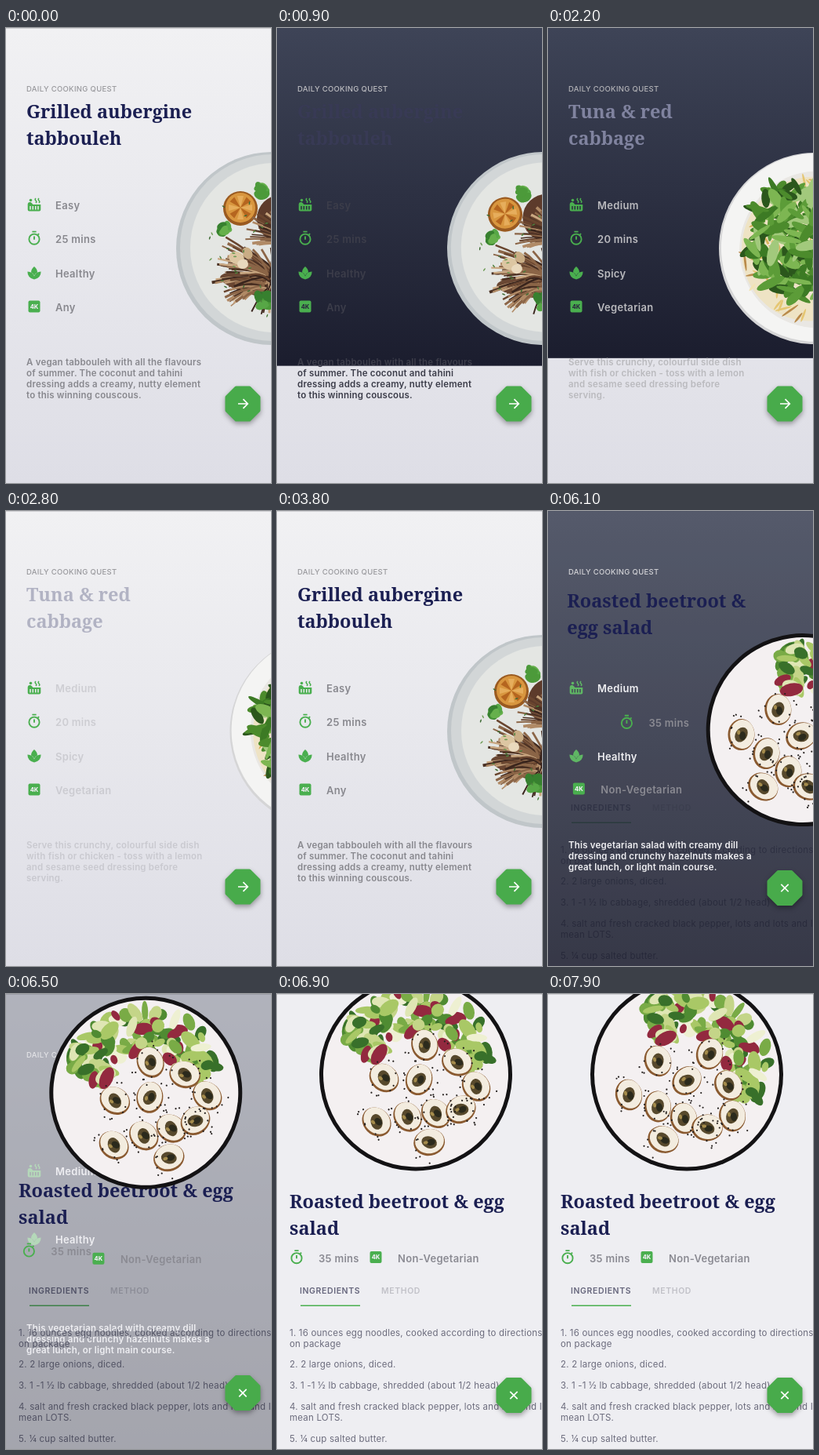
These frames come from a looping animation (338 px wide and 580 px high, 8000 ms). An HTML page:

```html
<!DOCTYPE html>
<html lang="en">
<head>
<meta charset="utf-8">
<title>Daily cooking quest</title>
<style>
html, body { margin: 0; width: 100%; height: 100%; overflow: hidden; background: #ececf0; }
svg { display: block; width: 100%; height: 100%; }
text { font-family: Inter, Roboto, sans-serif; white-space: pre; }
.title { font: 700 23.5px "Noto Serif", serif; }
.label { font-size: 9.5px; font-weight: 500; letter-spacing: .3px; }
.item { font-size: 13px; font-weight: 600; letter-spacing: .3px; }
.desc { font-size: 11.5px; font-weight: 600; letter-spacing: .2px; }
.step { font-size: 11.5px; letter-spacing: .2px; fill: #6c6c7d; }
.tab { font-size: 10.5px; font-weight: 600; letter-spacing: .6px; }
.k { font-size: 7.5px; font-weight: 800; }
#fab { filter: drop-shadow(0 3px 3px rgba(0, 0, 0, .35)); }
</style>
</head>
<body>
<svg id="stage" viewBox="0 0 338 580" preserveAspectRatio="none"></svg>
<script>
const LOOP = 8000, GREEN = '#4aaf4f';
const NAVY = [27, 31, 82], GREY = [136, 136, 142], WHITE = [240, 240, 243];
const DIM_TITLE = [70, 72, 86], DIM_TEXT = [22, 24, 40];
const LABEL_LIGHT = [152, 152, 156], LABEL_DARK = [208, 208, 212];
const BG_LIGHT = [236, 236, 240], BG_DARK = [42, 46, 62];

const recipes = [
  { title: ['Grilled aubergine', 'tabbouleh'], items: ['Easy', '25 mins', 'Healthy', 'Any'],
    desc: ['A vegan tabbouleh with all the flavours', 'of summer. The coconut and tahini',
      'dressing adds a creamy, nutty element', 'to this winning couscous.'] },
  { title: ['Tuna & red', 'cabbage'], items: ['Medium', '20 mins', 'Spicy', 'Vegetarian'],
    desc: ['Serve this crunchy, colourful side dish', 'with fish or chicken - toss with a lemon',
      'and sesame seed dressing before', 'serving.'] },
  { title: ['Roasted beetroot &', 'egg salad'], items: ['Medium', '35 mins', 'Healthy', 'Non-Vegetarian'],
    desc: ['This vegetarian salad with creamy dill', 'dressing and crunchy hazelnuts makes a',
      'great lunch, or light main course.'] }
];
const restAngle = [0, 0, 18];
// Page changes: sheet start, sheet end, plate swap end
const moves = [
  { from: 0, to: 1, dark: true, s: 400, e: 1150, end: 1500 },
  { from: 1, to: 0, dark: false, s: 1850, e: 2520, end: 3300 },
  { from: 0, to: 2, dark: true, s: 4000, e: 4850, end: 5500 }
];
const OPEN = 6000, OPEN_MS = 770;

const clamp = v => Math.max(0, Math.min(1, v));
const span = (t, a, b) => clamp((t - a) / (b - a));
const lerp = (a, b, k) => a + (b - a) * k;
const mix = (a, b, k) => `rgb(${a.map((v, i) => Math.round(lerp(v, b[i], k)))})`;
const smooth = u => u * u * (3 - 2 * u);
const easeOut = u => 1 - (1 - u) ** 3;

// cubic-bezier(.4, 0, .2, 1)
function fastSlow(x) {
  let lo = 0, hi = 1, s = .5;
  for (let i = 0; i < 20; i++) {
    s = (lo + hi) / 2;
    const r = 1 - s;
    if (1.2 * r * r * s + .6 * r * s * s + s ** 3 < x) lo = s; else hi = s;
  }
  return 3 * (1 - s) * s * s + s ** 3;
}

function random(seed) {
  return () => {
    seed = (seed + 0x6D2B79F5) | 0;
    let x = Math.imul(seed ^ (seed >>> 15), 1 | seed);
    x = (x + Math.imul(x ^ (x >>> 7), 61 | x)) ^ x;
    return ((x ^ (x >>> 14)) >>> 0) / 4294967296;
  };
}

const repeat = (n, f) => Array.from({ length: n }, (_, i) => f(i)).join('');
const esc = s => s.replace(/&/g, '&amp;');
const text = (x, y, cls, s, extra = '') => `<text x="${x}" y="${y}" class="${cls}" ${extra}>${esc(s)}</text>`;
const circle = (x, y, r, fill, extra = '') => `<circle cx="${x}" cy="${y}" r="${r}" fill="${fill}" ${extra}/>`;
const oval = (x, y, rx, ry, a, fill, extra = '') =>
  `<ellipse rx="${rx}" ry="${ry}" fill="${fill}" transform="translate(${x} ${y}) rotate(${a})" ${extra}/>`;

// Icons are drawn around their centre
const icons = {
  tub: `<g fill="${GREEN}">${circle(-4.5, -5.5, 1.8, GREEN)}
    <path d="M-8.3 0v-.5q0-2.5 2.4-2.5h.8q1 0 2 1.3l1.6 1.7h9.8v6.5q0 2-2 2h-12.6q-2 0-2-2z"/>
    <path d="M2-8q-1.6 1.5 0 3t0 3M6-8q-1.6 1.5 0 3t0 3" fill="none" stroke="${GREEN}" stroke-width="1.6"/></g>
    <path class="slot" d="M-5 2v4.5M-1.7 2v4.5M1.7 2v4.5M5 2v4.5" stroke-width="1.5"/>`,
  timer: `<g fill="none" stroke="${GREEN}" stroke-width="1.9"><circle cy="1.2" r="6.6"/>
    <path d="M-2.6-8.4h5.2M0-2.6v4.4M4.6-4.4l1.5-1.5"/></g>`,
  spa: `<g fill="${GREEN}"><path d="M0-8q4 3.3 4 7.6-2.8 1.6-4 4.2-1.2-2.6-4-4.2 0-4.3 4-7.6z"/>
    <path d="M-8.6-1.5q6.6 0 8.6 6 2-6 8.6-6 0 8.2-8.6 10-8.6-1.8-8.6-10z"/></g>`,
  tag: `<rect x="-7.5" y="-7.5" width="15" height="15" rx="2" fill="${GREEN}"/>
    <text class="k" y="2.8" text-anchor="middle">4K</text>`
};
const icon = (name, x, y, id = '') => `<g ${id && `id="${id}"`} transform="translate(${x} ${y})">${icons[name]}</g>`;

function page(r, n) {
  const row = (s, i) => text(63, [231, 274, 318, 361][i], 'item', s);
  return `<g id="page${n}"><g id="head${n}">${r.title.map((s, i) => text(26, 115 + i * 34, 'title', s)).join('')}</g>
    <g id="body${n}">${row(r.items[0], 0)}${row(r.items[2], 2)}
      <g class="flying">${row(r.items[1], 1)}${row(r.items[3], 3)}</g>
      ${r.desc.map((s, i) => text(26, 430 + i * 14, 'desc', s)).join('')}</g></g>`;
}

function auberginePlate() {
  const rnd = random(11), pick = a => a[Math.floor(rnd() * a.length)];
  const browns = ['#8b6547', '#4a3023', '#b08a66', '#69452f', '#c9a781', '#3a251d'];
  const fan = (n, x, y, a0, a1, len) => repeat(n, () => {
    const a = lerp(a0, a1, rnd()) * Math.PI / 180, l = len * (.55 + .45 * rnd());
    const ex = x + Math.cos(a) * l, ey = y + Math.sin(a) * l;
    return `<path d="M${x + rnd() * 14 - 7} ${y + rnd() * 14 - 7}Q${(x + ex) / 2} ${(y + ey) / 2 - 8} ${ex} ${ey}" stroke="${pick(browns)}" stroke-width="${1.5 + rnd() * 2.5}" fill="none"/>`;
  });
  const basil = (x, y, r) => repeat(9, () =>
    oval(x + (rnd() - .5) * r, y + (rnd() - .5) * r, r * .65, r * .42, rnd() * 180, pick(['#4c9a3a', '#66b04c', '#37802f', '#57a746'])));
  return circle(0, 0, 123, '#c0c6c9') + circle(1, -1, 119, '#d2d6d7') + circle(3, -1, 108, '#e4e6e3') +
    oval(-12, 48, 56, 14, 12, '#6a4733') + oval(10, -38, 30, 30, 0, '#5d3b2b') +
    circle(-41, -51, 22, '#9a5a20') + circle(-41, -52, 19, '#d8963f') +
    repeat(8, i => `<path d="M-41-52l-4-15h8z" fill="${i % 2 ? '#b5651f' : '#e6ad5c'}" transform="rotate(${i * 45} -41 -52)"/>`) +
    fan(46, 12, 42, 175, 222, 92) + fan(26, -8, 50, 150, 190, 55) + fan(34, 30, 0, 185, 262, 70) + fan(24, 0, 40, 0, 360, 50) +
    oval(-46, 12, 10, 8, 20, '#dcc6a2') + oval(-32, 6, 8, 6, 60, '#c9ad85') + oval(-38, 20, 7, 6, 0, '#e9d9bd') +
    basil(-13, -73, 11) + basil(-62, -24, 10) + basil(-12, 66, 13) + basil(40, 10, 12) +
    repeat(60, () => {
      const a = rnd() * 6.28, d = 30 + rnd() * 58;
      return oval(Math.cos(a) * d, Math.sin(a) * d, 2.2, .8, rnd() * 180, pick(['#4d7f3d', '#6b9a52', '#3d6a33']));
    });
}

function tunaPlate() {
  const rnd = random(5), pick = a => a[Math.floor(rnd() * a.length)];
  const scatter = (n, x, y, r, f) => repeat(n, () => {
    const a = rnd() * 6.28, d = Math.sqrt(rnd()) * r;
    return f(x + Math.cos(a) * d, y + Math.sin(a) * d);
  });
  return circle(0, 0, 122, '#d5d5d6') + circle(1, -1, 120, '#f4f4f3') + circle(4, 2, 100, '#e9e7e3') +
    oval(-5, 0, 88, 92, 20, '#eee3c4') +
    scatter(130, -5, 2, 92, (x, y) => oval(x, y, 6 + rnd() * 7, 1.4, rnd() * 180, pick(['#e5c672', '#d9b25c', '#f2e3b4', '#b98a4a', '#efe6d6']))) +
    scatter(190, -2, -14, 76, (x, y) => oval(x - 4, y, 9 + rnd() * 11, 3 + rnd() * 4, rnd() * 180,
      pick(['#3c7a24', '#5c9c38', '#2b571c', '#7db652', '#4c8b2c', '#a2c97c'])));
}

function eggPlate() {
  const rnd = random(23), pick = a => a[Math.floor(rnd() * a.length)];
  const rolls = [[29, -26], [-37, -17], [53, 14], [0, 8], [58, 53], [-74, 26], [-37, 41], [-30, 83], [-4, 56], [26, 68]];
  const greens = repeat(130, () => {
    const a = lerp(-128, 22, rnd()) * Math.PI / 180, d = 52 + rnd() * 54;
    return oval(Math.cos(a) * d, Math.sin(a) * d, 6 + rnd() * 9, 4 + rnd() * 5, rnd() * 180,
      pick(['#4f8b32', '#79ab46', '#dfe6b4', '#c4d588', '#eef0d2', '#93293f', '#38702a', '#a9c866']));
  });
  return circle(0, 0, 123, '#131214') + circle(0, 0, 118, '#f4f0f1') + greens +
    rolls.map(([x, y]) => {
      const a = rnd() * 180;
      return oval(x, y, 20, 17, a, '#8a5a30') + oval(x + 1, y - 1, 18.5, 15.5, a, '#f3ecdf') +
        oval(x, y, 10, 7.5, a + 30, '#57492c') + oval(x + 2, y + 1, 5.5, 4, a, '#2b2a1c') + oval(x - 4, y - 2, 3, 2, a, '#a58c4c');
    }).join('') +
    repeat(120, () => {
      const [x, y] = pick(rolls), a = rnd() * 6.28, d = 15 + rnd() * 12;
      return circle(x + Math.cos(a) * d, y + Math.sin(a) * d, 1.1, '#25201e');
    });
}

const steps = [[436, '1. 16 ounces egg noodles, cooked according to directions'], [450, 'on package'],
  [476, '2. 2 large onions, diced.'], [503, '3. 1 -1 ½ lb cabbage, shredded (about 1/2 head)'],
  [530, '4. salt and fresh cracked black pepper, lots and lots and I'], [544, 'mean LOTS.'],
  [571, '5. ¼ cup salted butter.']];

const stop = (o, c) => `<stop offset="${o}" stop-color="${c}"/>`;
const down = (id, a, b) => `<linearGradient id="${id}" x2="0" y2="1">${stop(0, a)}${stop(1, b)}</linearGradient>`;
const hero = (id, name, s) => `<g id="${id}">${icon(name, -28, -6)}${text(0, 0, 'item', s, 'fill="#8a8a92"')}</g>`;

document.getElementById('stage').innerHTML = `
  <defs>${down('light', '#f1f1f3', '#dedee6')}${down('dark', '#3e4457', '#1b1d2e')}</defs>
  <rect width="338" height="580" fill="url(#light)"/>
  <rect width="338" height="1" fill="#cfcfd2"/>
  <rect id="sheet" width="338" height="0" fill="url(#dark)"/>
  ${text(26, 81, 'label', 'DAILY COOKING QUEST', 'id="label"')}
  ${recipes.map(page).join('')}
  <g id="icons">${icon('tub', 36, 225)}${icon('spa', 36, 312)}
    <g class="flying">${icon('timer', 36, 268)}${icon('tag', 36, 355)}</g></g>
  <g id="detail"><rect width="338" height="580" fill="#eeeef2"/><rect width="338" height="1" fill="#cfcfd2"/>
    ${text(29, 382, 'tab', 'INGREDIENTS', 'fill="#66667c"')}${text(133, 382, 'tab', 'METHOD', 'fill="#c0c0c7"')}
    <rect x="30" y="396.5" width="76" height="1.5" fill="${GREEN}"/>
    ${steps.map(([y, s]) => text(16, y, 'step', s)).join('')}</g>
  <g id="heroes">${hero('time', 'timer', '35 mins')}${hero('kind', 'tag', 'Non-Vegetarian')}
    <g id="name" fill="rgb(${NAVY})">
      <g id="narrow">${text(0, 0, 'title', 'Roasted beetroot &')}${text(0, 34, 'title', 'egg salad')}</g>
      <g id="wide">${text(0, 0, 'title', 'Roasted beetroot & egg')}${text(0, 34, 'title', 'salad')}</g></g></g>
  ${[auberginePlate, tunaPlate, eggPlate].map((f, i) => `<g id="plate${i}">${f()}</g>`).join('')}
  <g id="fab"><path d="M-8.5-20.5h17l12 12v17l-12 12h-17l-12-12v-17z" fill="#48ab4b" stroke="#48ab4b" stroke-width="4" stroke-linejoin="round"/>
    <g fill="none" stroke="#fff" stroke-width="1.7"><path id="arrow" d="M-6 0h12M.5-5.8l5.8 5.8-5.8 5.8"/>
    <path id="cross" d="M-4.7-4.7l9.4 9.4M4.7-4.7l-9.4 9.4"/></g></g>`;

const $ = id => document.getElementById(id);
const set = (node, attrs) => { for (const k in attrs) node.setAttribute(k, attrs[k]); };
const show = (node, on) => set(node, { visibility: on ? 'visible' : 'hidden' });
const place = (node, x, y, a = 0) => set(node, { transform: `translate(${x} ${y}) rotate(${a})` });
const flying = document.querySelectorAll('.flying');
const slots = document.querySelectorAll('#icons .slot'), marks = document.querySelectorAll('#icons .k');
document.querySelector('#kind .k').setAttribute('fill', '#eeeef2');

function drawPage(n, alpha, title, body) {
  set($('page' + n), { opacity: alpha });
  set($('head' + n), { fill: title });
  set($('body' + n), { fill: body });
}

function drawList(t) {
  const m = moves.filter(v => t >= v.s).pop() || { from: 0, to: 0, dark: false, s: -3, e: -2, end: -1 };
  const u = span(t, m.s, m.e), swap = span(t, m.e, m.end);
  const out = clamp(swap * 2), into = clamp(swap * 2 - 1);
  const first = m.from === m.to;
  const cover = first ? 0 : m.dark ? smooth(u) : 1 - u * u;
  const tone = first ? 0 : m.dark ? u : 1 - u;

  set($('sheet'), { height: 580 * cover });
  set($('label'), { fill: mix(LABEL_LIGHT, LABEL_DARK, tone) });
  const cut = mix(BG_LIGHT, BG_DARK, clamp(cover * 2));
  slots.forEach(s => set(s, { stroke: cut }));
  marks.forEach(s => set(s, { fill: cut }));

  recipes.forEach((_, n) => {
    drawPage(n, 0, 'none', 'none');
    place($('plate' + n), 520, 281);
  });
  if (swap < .5) {
    const [t0, t1, b0, b1] = m.dark ? [NAVY, DIM_TITLE, GREY, DIM_TEXT] : [WHITE, NAVY, WHITE, GREY];
    drawPage(m.from, 1 - out, mix(t0, t1, u), mix(b0, b1, u));
    place($('plate' + m.from), 340 + 130 * out * out, 281, restAngle[m.from] - 14.5 * u - 50 * out * out);
  } else {
    const k = easeOut(into);
    drawPage(m.to, into, `rgb(${m.dark ? WHITE : NAVY})`, `rgb(${m.dark ? WHITE : GREY})`);
    place($('plate' + m.to), 340 + 130 * (1 - k), 281, restAngle[m.to] + 50 * (1 - k));
  }
}

function drawDetail(t) {
  const open = t >= OPEN, u = span(t, OPEN, OPEN + OPEN_MS), p = fastSlow(u), q = 1 - p;
  set($('detail'), { opacity: open ? u : 0 });
  show($('heroes'), open);
  show($('arrow'), !open);
  show($('cross'), open);
  flying.forEach(g => show(g, !open));
  show($('head2'), !open);
  place($('fab'), 302, lerp(479, 511.5, open ? p : 0));
  if (!open) return;

  place($('name'), lerp(26, 16, 1 - q ** 4), lerp(115, 273, p));
  show($('narrow'), p < .5);
  show($('wide'), p >= .5);
  place($('time'), 53 + 80 * q ** 1.2, lerp(274.5, 341.5, p ** 1.5));
  place($('kind'), lerp(63, 154, p), lerp(361, 341.5, p));
  const settle = easeOut(span(t, OPEN + OPEN_MS, 7900));
  place($('plate2'), lerp(340, 177, 1 - q * q), lerp(281, 102.5, p ** 1.5), lerp(18, -45, p) + 45 * settle);
}

function draw(t) {
  drawList(t);
  drawDetail(t);
}

const start = performance.now();
function tick() {
  draw((performance.now() - start) % LOOP);
  requestAnimationFrame(tick);
}
tick();
</script>
</body>
</html>
```
